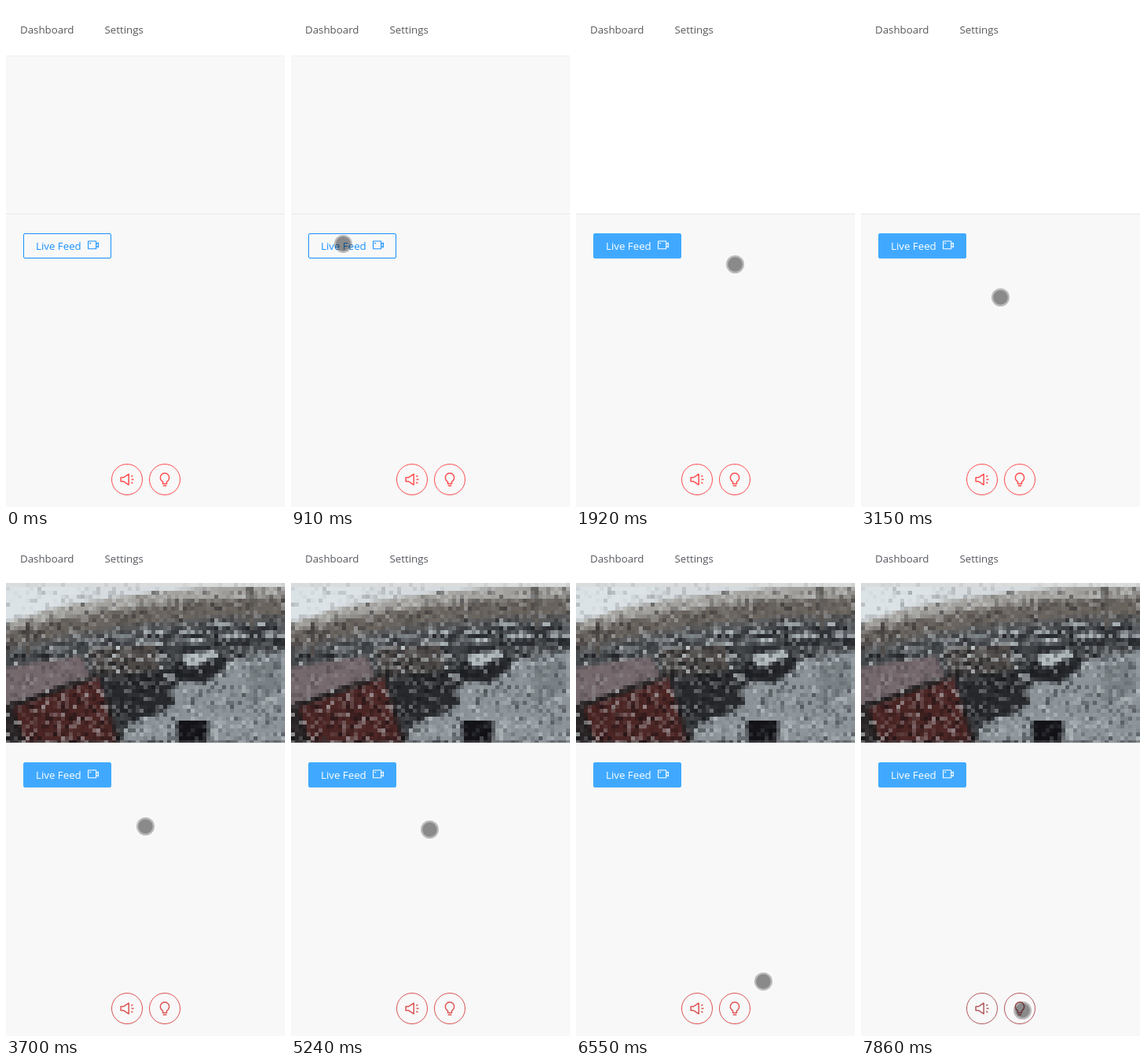
An HTML page with a canvas for the animation above (8000 ms loop, 355 by 637 pixels).

```html
<!DOCTYPE html>
<html lang="en">
<head>
<meta charset="utf-8">
<title>Dashboard</title>
<style>
  html, body { margin: 0; width: 100%; height: 100%; overflow: hidden; background: #f8f8f8; }
  canvas { display: block; width: 355px; height: 637px; }
</style>
</head>
<body>
<canvas id="stage" width="355" height="637"></canvas>
<script>
const LOOP = 8000;
const CLICK = 1070;
const FEED_ON = 3700;
const CELL = 5;
const COLS = 71;
const ROWS = 41;
const FEED_TOP = 61;
const FEED_BOTTOM = 264;
const PAGE = '#f8f8f8';
const ctx = document.getElementById('stage').getContext('2d');

const clamp = v => Math.max(0, Math.min(1, v));
const easeInOut = u => u < 0.5 ? 4 * u ** 3 : 1 - (2 - 2 * u) ** 3 / 2;
const mix = (a, b, u) => `rgb(${a.map((v, i) => Math.round(v + (b[i] - v) * u)).join()})`;
const hash = (x, y, s) => {
  const v = Math.sin(x * 127.1 + y * 311.7 + s * 74.7) * 43758.5453;
  return v - Math.floor(v);
};

// Camera picture on a coarse grid: curved bands, rows of cars, a few large shapes.
function paintScene() {
  const canvas = document.createElement('canvas');
  canvas.width = COLS;
  canvas.height = ROWS;
  const g = canvas.getContext('2d');
  let seed = 0;

  function fillGrained(path, color, grain) {
    seed++;
    g.fillStyle = color;
    g.fill(path);
    for (let y = 0; y < ROWS; y++) {
      for (let x = 0; x < COLS; x++) {
        if (!g.isPointInPath(path, x + 0.5, y + 0.5)) continue;
        const n = grain * (2 * hash(x, y, seed) - 1) ** 3;
        g.fillStyle = n > 0 ? `rgba(215,222,226,${n})` : `rgba(10,12,16,${-n})`;
        g.fillRect(x, y, 1, 1);
      }
    }
  }

  function shape(color, grain, ...points) {
    const path = new Path2D();
    for (const [x, y] of points) path.lineTo(x / CELL, (y - FEED_TOP) / CELL);
    path.closePath();
    fillGrained(path, color, grain);
  }

  // The wide lens bends the ground down towards the left edge.
  const bend = x => 42 * (1 - x / 355) ** 2;

  function band(color, grain, top) {
    const edge = Array.from({ length: COLS + 1 }, (_, i) => [i * CELL, top + bend(i * CELL)]);
    shape(color, grain, ...edge, [355, FEED_BOTTOM], [0, FEED_BOTTOM]);
  }

  function box(color, grain, x, y, w, h) {
    shape(color, grain, [x, y], [x + w, y], [x + w, y + h], [x, y + h]);
  }

  function carRow(y, size) {
    for (let x = 55; x < 355; x += size * 1.6) {
      const top = y + bend(x) + 8 * (hash(x, y, 3) - 0.5);
      box('#a9b1b5', 0.5, x, top, size, size * 0.2);
      box('#292c30', 0.4, x - 4, top + size * 0.2, size + 8, size * 0.25);
    }
  }

  box('#d5dbde', 0.2, 0, 61, 355, 203);
  band('#a3a19d', 0.45, 64);
  band('#6a645f', 0.4, 80);
  band('#59595a', 0.5, 101);
  band('#44474a', 0.7, 110);
  shape('#dce3e7', 0.2, [0, 66], [110, 66], [55, 93], [0, 112]);
  box('#dadcdc', 0.1, 0, 61, 355, 5);
  carRow(112, 26);
  carRow(122, 34);
  shape('#8c9499', 0.45, [205, 200], [285, 160], [355, 146], [355, 264], [140, 264]);
  shape('#777f84', 0.3, [310, 165], [350, 160], [350, 190], [305, 225]);
  shape('#26282c', 0.4, [215, 160], [272, 148], [280, 168], [250, 190], [212, 180]);
  shape('#b4bcc0', 0.4, [222, 153], [266, 146], [272, 155], [232, 168]);
  shape('#4d4947', 0.8, [105, 145], [190, 138], [195, 174], [115, 182]);
  shape('#28292c', 0.4, [118, 180], [198, 172], [216, 214], [190, 230], [138, 234]);
  shape('#75696d', 0.2, [0, 168], [95, 154], [108, 178], [0, 218]);
  shape('#2a2526', 0.6, [0, 216], [116, 176], [150, 264], [0, 264]);
  shape('#4c2625', 0.55, [10, 220], [118, 182], [140, 264], [24, 264]);
  box('#131318', 0.2, 218, 236, 39, 28);
  box('#504b48', 0.2, 25, 110, 5, 45);
  box('#615d59', 0.2, 310, 66, 5, 52);
  return canvas;
}

const scene = paintScene();

function drawFeed(t) {
  ctx.save();
  ctx.beginPath();
  ctx.rect(0, FEED_TOP, 355, FEED_BOTTOM - FEED_TOP);
  ctx.clip();
  ctx.imageSmoothingEnabled = false;
  ctx.drawImage(scene, 0, FEED_TOP, COLS * CELL, ROWS * CELL);
  const tick = Math.floor(t / 77);
  for (let row = 2; row < ROWS; row++) {
    for (let col = 0; col < COLS; col++) {
      const n = hash(col, row, tick);
      if (n > 0.06) continue;
      ctx.fillStyle = n < 0.03 ? 'rgba(205,210,215,.1)' : 'rgba(10,12,16,.12)';
      ctx.fillRect(col * CELL, FEED_TOP + row * CELL, CELL, CELL);
    }
  }
  ctx.restore();
}

function text(str, x, y, color) {
  ctx.font = '13.3px "Open Sans", "Noto Sans", sans-serif';
  ctx.fillStyle = color;
  ctx.fillText(str, x, y);
}

function disc(x, y, r, color) {
  ctx.fillStyle = color;
  ctx.beginPath();
  ctx.arc(x, y, r, 0, 2 * Math.PI);
  ctx.fill();
}

function strokeIcon(icon, color, width) {
  ctx.strokeStyle = color;
  ctx.lineWidth = width;
  ctx.lineJoin = 'round';
  ctx.stroke(new Path2D(icon));
}

const CAMERA = 'M105 299h9.3q.4 0 .4.4v9q0 .4-.4.4h-9.3q-.4 0-.4-.4v-9q0-.4.4-.4zM114.7 302.7l2.7-1.5v5.5l-2.7-1.5M106.3 301.6h1.8';
const SPEAKER = 'M146.1 599.6h3.3l6.8-4.4v13.6l-6.8-4.4h-3.3zM159.6 602h2.9M159.2 598.4l2.2-1.2M159.2 605.6l2.2 1.2';
const BULB = 'M199.5 607.4v-2.6a5.7 5.7 0 1 1 5 0v2.6zM199.7 609.9h4.6';

function drawLiveButton(t) {
  const wave = clamp((t - CLICK) / 400);
  if (wave > 0 && wave < 1) {
    const spread = 6 * (1 - (1 - wave) ** 3);
    ctx.fillStyle = `rgba(24,144,255,${0.17 * (1 - wave * 0.6)})`;
    ctx.beginPath();
    ctx.roundRect(22 - spread, 289 - spread, 112 + 2 * spread, 32 + 2 * spread, 2 + spread);
    ctx.fill();
  }
  const fill = easeInOut(clamp((t - 1095) / 300));
  const idle = [24, 144, 255];
  const active = [64, 169, 255];
  ctx.fillStyle = 'rgba(0,0,0,.02)';
  ctx.fillRect(23, 321, 110, 2);
  ctx.fillStyle = mix([248, 248, 248], active, fill);
  ctx.strokeStyle = mix(idle, active, fill);
  ctx.lineWidth = 1;
  ctx.beginPath();
  ctx.roundRect(22.5, 289.5, 111, 31, 1.5);
  ctx.fill();
  ctx.stroke();
  const ink = mix(idle, [255, 255, 255], clamp(fill * 2.2));
  text('Live Feed', 38, 310, ink);
  strokeIcon(CAMERA, ink, 1.1);
}

function drawRoundButton(cx, color, icon) {
  disc(cx, 604, 20, 'rgba(0,0,0,.025)');
  disc(cx, 602, 19.5, PAGE);
  ctx.strokeStyle = color;
  ctx.lineWidth = 1;
  ctx.stroke();
  strokeIcon(icon, color, 1.5);
}

// Pointer moves: start time, duration, end x, end y
const MOVES = [
  [70, 370, 78, 231], [440, 150, 66, 302], [910, 320, 52, 264], [1230, 460, 196, 304],
  [1690, 230, 202, 328], [2920, 0, 179, 368], [3150, 0, 177, 370], [5080, 160, 176, 374],
  [5460, 1090, 238, 567], [6550, 400, 215, 619], [6950, 300, 205, 604]
];

function drawPointer(t) {
  if (t < MOVES[0][0]) return;
  let [x, y] = [267, 548];
  for (const [at, ms, endX, endY] of MOVES) {
    if (t < at) break;
    const u = ms ? clamp((t - at) / ms) : 1;
    x += (endX - x) * u;
    y += (endY - y) * u;
  }
  disc(x + 0.5, y + 0.5, 11.5, 'rgba(0,0,0,.25)');
  disc(x + 0.5, y + 0.5, 9.3, 'rgba(0,0,0,.26)');
}

function draw(t) {
  const live = t >= FEED_ON;
  ctx.fillStyle = PAGE;
  ctx.fillRect(0, 0, 355, 637);
  ctx.fillStyle = '#fff';
  ctx.fillRect(0, 0, 355, t < CLICK ? 63 : FEED_BOTTOM);
  ctx.fillStyle = '#e8e8e8';
  ctx.fillRect(0, FEED_BOTTOM, 355, 1);
  if (t < CLICK) {
    ctx.fillStyle = '#f0f0f0';
    ctx.fillRect(0, 63, 355, 1);
  }
  if (live) drawFeed(t);
  const ink = live ? '#55595f' : '#595959';
  text('Dashboard', 18, 35, ink);
  text('Settings', 125.5, 35, ink);
  drawLiveButton(t);
  const red = t >= 7180 ? '#b4585c' : live ? '#dc5352' : '#ff4d4f';
  drawRoundButton(154, red, SPEAKER);
  drawRoundButton(202, red, BULB);
  drawPointer(t);
}

const start = performance.now();
function frame() {
  draw((performance.now() - start) % LOOP);
  requestAnimationFrame(frame);
}
frame();
</script>
</body>
</html>
```
